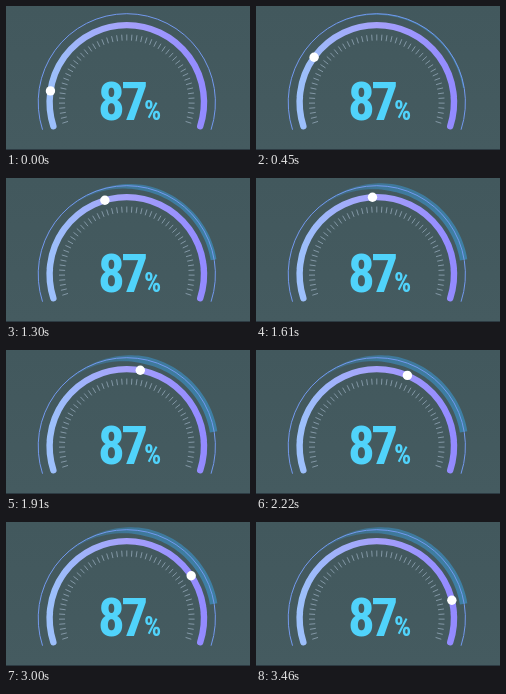
An HTML page that plays this animation: 244 px wide and 144 px high, repeating every 3.54 s.

```html
<!DOCTYPE html>
<html lang="en">
<head>
<meta charset="utf-8">
<title>Gauge</title>
<style>
  html, body { margin: 0; width: 100%; height: 100%; overflow: hidden; background: #445a5f; }
  svg { display: block; width: 100%; height: 100%; }
  text { font: bold 53px "Liberation Sans Narrow", "Roboto Condensed", Roboto, sans-serif; font-stretch: 75%; letter-spacing: -3.5px; fill: #50d3fb; }
  .unit { font-size: 27px; letter-spacing: 0; }
</style>
</head>
<body>
<svg viewBox="0 0 244 144" fill="none">
  <defs>
    <linearGradient id="back" x2="0" y2="1">
      <stop stop-color="#42585d"/><stop offset="1" stop-color="#455b60"/>
    </linearGradient>
    <linearGradient id="track">
      <stop stop-color="#9cc0fa"/><stop offset=".5" stop-color="#a5a0fb"/><stop offset="1" stop-color="#938aff"/>
    </linearGradient>
    <linearGradient id="glow" gradientUnits="userSpaceOnUse" x1="70" x2="205" y1="0" y2="0">
      <stop stop-color="#3c8cc0" stop-opacity=".25"/><stop offset=".4" stop-color="#3c8cc0" stop-opacity=".6"/><stop offset="1" stop-color="#3c8cbc" stop-opacity=".75"/>
    </linearGradient>
  </defs>
  <rect width="244" height="144" fill="url(#back)"/>
  <rect y="143" width="244" height="1" fill="#2d3b43"/>
  <path id="band" fill="url(#glow)"/>
  <path id="rim" stroke="#7399ee"/>
  <path id="ticks" stroke="#93a8b8" stroke-width=".8"/>
  <path id="arc" stroke="url(#track)" stroke-width="6.4" stroke-linecap="round"/>
  <text x="92" y="113.5">87<tspan class="unit" x="138">%</tspan></text>
  <circle id="dot" r="4.7" fill="#fff"/>
</svg>
<script>
const LOOP = 3540, HOLD = 210, STEP = 77.2, LAST = 42;
const START = -18, END = 198, VALUE = 170.5, TICKS = 50;
const el = id => document.getElementById(id);

// Angles in degrees, clockwise from the left.
function point(r, deg) {
  const a = deg * Math.PI / 180;
  return [120.8 - r * Math.cos(a), 96.3 - r * Math.sin(a)].map(v => v.toFixed(2));
}

const arc = r => `M${point(r, START)}A${r} ${r} 0 1 1 ${point(r, END)}`;

function bandPath(width) {
  const from = 45, n = 60, outer = [], inner = [];
  for (let i = 0; i <= n; i++) {
    const deg = from + (VALUE - from) * i / n;
    const half = width / 2 * Math.min(1, 2.2 * i / n);
    outer.push(point(88 + half, deg));
    inner.unshift(point(88 - half, deg));
  }
  return "M" + outer.concat(inner).join("L") + "Z";
}

function draw(time) {
  const n = time < HOLD ? -1 : Math.min(LAST, Math.floor((time - HOLD) / STEP));
  const t = n < 0 ? 0 : HOLD + n * STEP;
  const lag = 9.5 * Math.max(0, 1 - t / 700) ** 2;
  const [x, y] = point(77.2, 18 + 0.043 * t - lag);
  el("dot").setAttribute("cx", x);
  el("dot").setAttribute("cy", y);
  const grow = Math.min(1, Math.max(0, (t - HOLD) / 1400));
  el("band").setAttribute("d", grow ? bandPath(7.5 * grow) : "");
}

el("rim").setAttribute("d", arc(88.6));
el("arc").setAttribute("d", arc(77.2));
let marks = "";
for (let i = 0; i <= TICKS; i++) {
  const deg = START + (END - START) * i / TICKS;
  marks += `M${point(61.8, deg)}L${point(67.8, deg)}`;
}
el("ticks").setAttribute("d", marks);

const begin = performance.now();
function frame() {
  draw((performance.now() - begin) % LOOP);
  requestAnimationFrame(frame);
}
frame();
</script>
</body>
</html>
```
